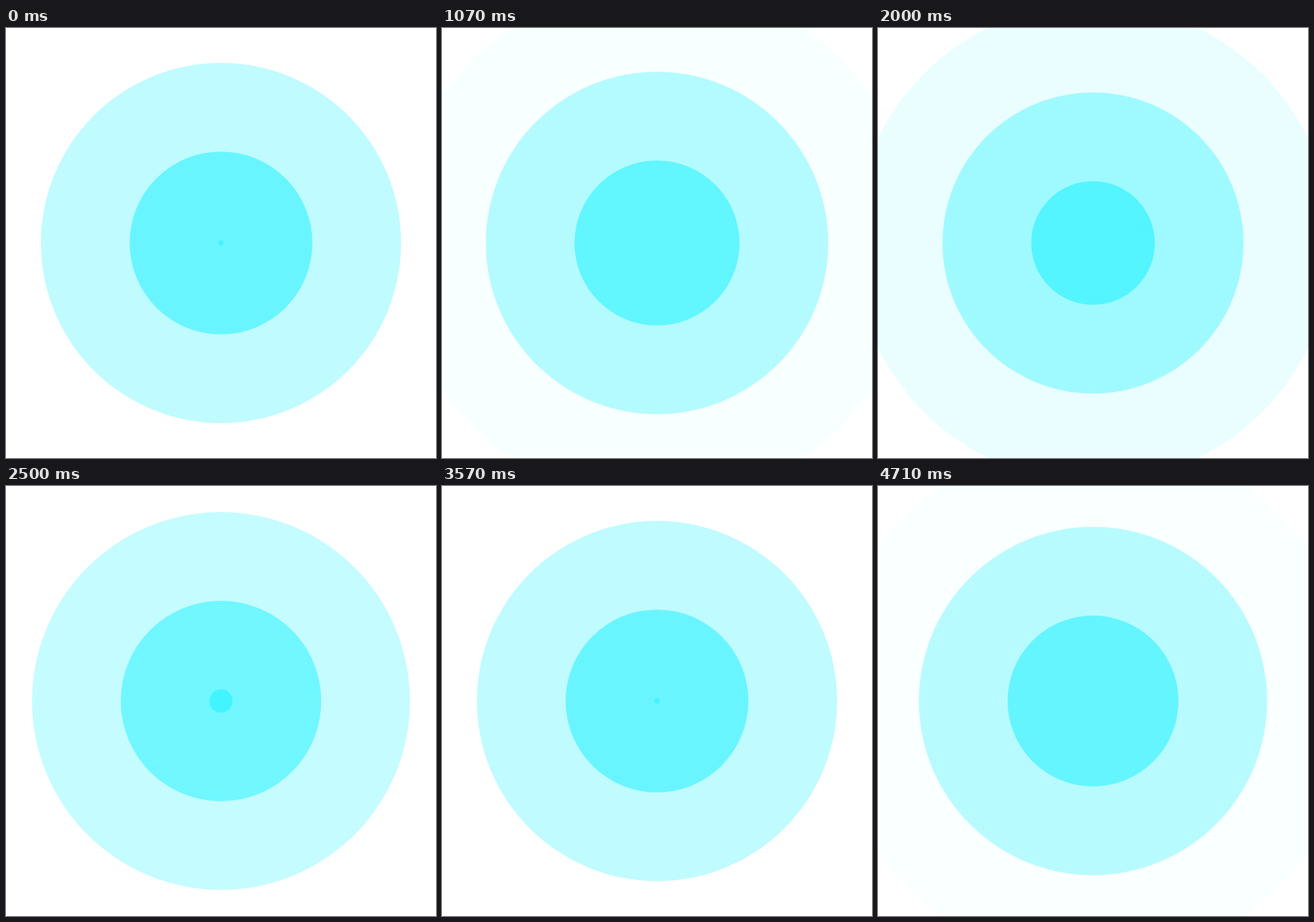
These frames come from a looping animation (640 by 640 pixels, 4.78 s). An HTML page:

```html
<!DOCTYPE html>
<html lang="en">
<head>
<meta charset="utf-8">
<title>Ripples</title>
<style>
  html, body { margin: 0; width: 100%; height: 100%; overflow: hidden; background: #fff; }
  svg { display: block; width: 100%; height: 100%; }
  circle { fill: #40f4ff; }
</style>
</head>
<body>
<svg viewBox="0 0 640 640">
  <circle cx="320" cy="320"/>
  <circle cx="320" cy="320"/>
  <circle cx="320" cy="320"/>
</svg>
<script>
  const LOOP = 4780;   // ms
  const FPS = 14;      // displayed rate
  const TICKS = 25;    // motion ticks per second
  const GAP = 30;      // ticks between ripples
  const LIFE = 90;     // ticks until a ripple has faded
  const rings = [...document.querySelectorAll('circle')];

  // Step boundaries fall on whole hundredths of a second.
  function tickAt(ms) {
    const step = Math.floor((Math.floor(ms / 10) * 10 + 5) * FPS / 1000);
    return Math.ceil(step * TICKS / FPS);
  }

  function draw(ms) {
    const phase = tickAt(ms % LOOP) % GAP;
    rings.forEach((ring, i) => {
      const age = phase + GAP * (rings.length - 1 - i);
      ring.setAttribute('r', 4 + 4.4 * age);
      ring.setAttribute('fill-opacity', 1 - age / LIFE);
    });
  }

  function loop() {
    draw(performance.now());
    requestAnimationFrame(loop);
  }

  draw(0);
  requestAnimationFrame(loop);
</script>
</body>
</html>
```
